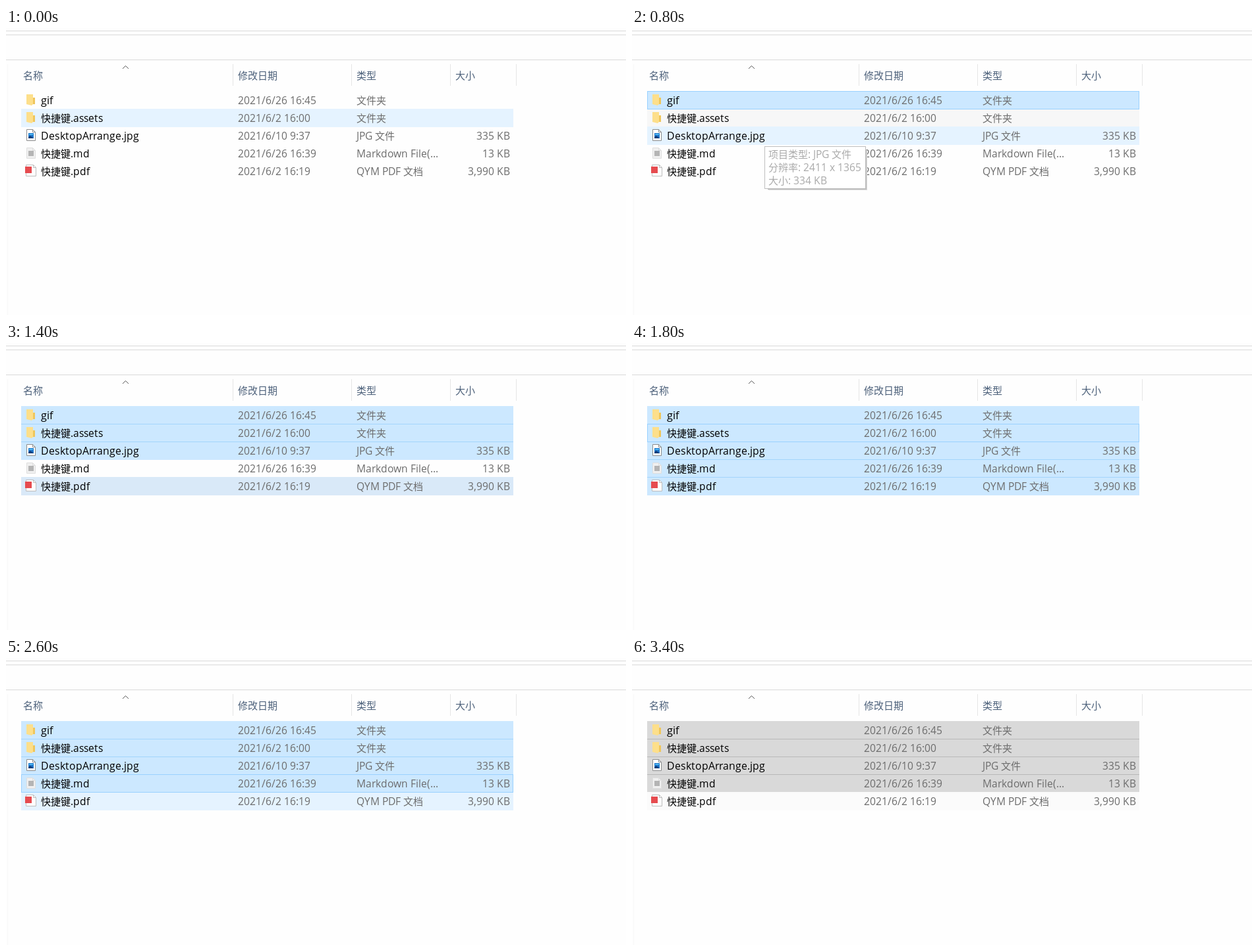
These frames come from a looping animation (941x437 px, 3600 ms). An HTML page with a canvas:

```html
<!DOCTYPE html>
<html lang="zh-CN">
<head>
<meta charset="utf-8">
<style>
html, body { margin: 0; width: 100%; height: 100%; overflow: hidden; background: #fefefe; }
canvas { display: block; }
</style>
</head>
<body>
<canvas id="stage" width="941" height="437"></canvas>
<script>
const ctx = document.getElementById('stage').getContext('2d');
const LOOP = 3600, TOP = 96, PITCH = 27, LEFT = 23, WIDTH = 747;

// icon, name, name size, modified, type, size
const files = [
  [folder, 'gif', 16.2, '2021/6/26 16:45', '文件夹', ''],
  [folder, '快捷键.assets', 15.6, '2021/6/2 16:00', '文件夹', ''],
  [picture, 'DesktopArrange.jpg', 15.8, '2021/6/10 9:37', 'JPG 文件', '335 KB'],
  [markdown, '快捷键.md', 15.6, '2021/6/26 16:39', 'Markdown File(...', '13 KB'],
  [pdf, '快捷键.pdf', 15.6, '2021/6/2 16:19', 'QYM PDF 文档', '3,990 KB'],
];

// h hover, s selected, b selected with border, g inactive, f/l/p fading
const fills = {
  h: '#e5f3ff', s: '#cce8ff', b: '#cce8ff', g: '#d9d9d9',
  f: '#f7f7f7', l: '#fbfbfb', p: '#d9e9f8',
};

// start time, one state per row
const steps = [
  [0, '.h...'], [400, 'h....'], [600, 'bh...'], [800, 'bfh..'], [1000, 'ssb..'],
  [1200, 'ssb.p'], [1400, 'sss.p'], [1600, 'sssbs'], [1800, 'sbsss'], [2000, 'sb.ff'],
  [2200, 'sbhff'], [2400, 'sssbf'], [2600, 'sssbh'], [3000, 'sssbl'], [3400, 'ggggl'],
];

function rect(x, y, w, h, color) {
  ctx.fillStyle = color;
  ctx.fillRect(x, y, w, h);
}

function frame(x, y, w, h, color) {
  ctx.lineWidth = 1;
  ctx.strokeStyle = color;
  ctx.strokeRect(x + .5, y + .5, w - 1, h - 1);
}

function shape(points, fill, stroke) {
  ctx.beginPath();
  for (let i = 0; i < points.length; i += 2) ctx.lineTo(points[i], points[i + 1]);
  if (fill) { ctx.closePath(); ctx.fillStyle = fill; ctx.fill(); }
  if (stroke) { ctx.lineWidth = 1; ctx.strokeStyle = stroke; ctx.stroke(); }
}

// Whole-pixel advances, as in hinted interface text; Chinese is slightly smaller
function text(str, x, y, color, size = 15.6, alignRight = false) {
  const advance = char => {
    ctx.font = char >= '\u4e00'
      ? '15px "Noto Sans CJK SC", "Noto Sans CJK", sans-serif'
      : `${size}px "Open Sans", "Noto Sans", sans-serif`;
    return Math.round(ctx.measureText(char).width);
  };
  if (alignRight) x -= [...str].reduce((sum, char) => sum + advance(char), 0);
  ctx.fillStyle = color;
  for (const char of str) {
    const width = advance(char);
    ctx.fillText(char, x, y);
    x += width;
  }
}

function folder(y) {
  rect(31, y + 10, 13, 10, '#efc65c');
  shape([31, y + 5, 41, y + 5, 41, y + 20, 39, y + 22, 31, y + 20], '#fddf8b');
}

function page(x, y, w, h, fill, line) {
  shape([x, y, x + w - 4, y, x + w, y + 4, x + w, y + h, x, y + h, x, y], fill, line);
  shape([x + w - 4, y, x + w - 4, y + 4, x + w, y + 4], null, line);
}

function picture(y) {
  page(31.5, y + 4.5, 13, 17, '#fff', '#8c8c8c');
  rect(34, y + 10, 8, 8, '#1c74c8');
  rect(35, y + 11, 6, 2, '#4db4ef');
  shape([34, y + 18, 34, y + 16, 37, y + 14, 42, y + 18], '#103c78');
}

function markdown(y) {
  page(31.5, y + 5.5, 13, 16, '#f0f0f0', '#dedede');
  rect(34, y + 10, 8, 8, '#b4b4b4');
}

function pdf(y) {
  page(30.5, y + 4.5, 15, 17, '#fff', '#bcbcbc');
  rect(29, y + 7, 10, 10, '#e64b4f');
}

function chrome() {
  rect(0, 0, 941, 437, '#fefefe');
  for (const y of [4, 10, 48]) rect(0, y, 941, 1, '#d9d9d9');
  rect(2, 55, 1, 382, '#f8f8f8');
  for (const x of [344, 524, 674, 774]) rect(x, 55, 1, 33, '#e5e5e5');
  shape([177, 62, 181.5, 57.5, 186, 62], null, '#5a5a5a');
  [['名称', 26], ['修改日期', 352], ['类型', 532], ['大小', 682]]
    .forEach(([label, x]) => text(label, x, 78, '#4c607a'));
}

function highlights(states) {
  const rowY = i => TOP + i * PITCH;
  const selected = s => 'sbg'.includes(s);
  states.forEach((s, i) => {
    if (fills[s]) rect(LEFT, rowY(i), WIDTH, 28, fills[s]);
  });
  states.forEach((s, i) => {
    if (i && selected(s) && selected(states[i - 1]))
      rect(LEFT, rowY(i), WIDTH, 1, s === 'g' ? '#b8b8b8' : '#a3d5fc');
  });
  states.forEach((s, i) => {
    if (s === 'b') frame(LEFT, rowY(i), WIDTH, 28, '#99d1ff');
  });
}

function tooltip() {
  rect(207, 186, 150, 61, '#dadada');
  rect(206, 185, 150, 61, '#bebebe');
  rect(201, 180, 154, 65, '#fff');
  frame(201, 180, 154, 65, '#bebebe');
  ['项目类型: JPG 文件', '分辨率: 2411 x 1365', '大小: 334 KB']
    .forEach((line, i) => text(line, 207, 198 + i * 20, '#aaa'));
}

function draw(now) {
  const t = now % LOOP;
  const [start, states] = steps.findLast(([time]) => time <= t);
  chrome();
  highlights([...states]);
  files.forEach(([icon, name, nameSize, date, type, size], i) => {
    const y = TOP + i * PITCH, base = y + 20;
    icon(y);
    text(name, 53, base, '#000', nameSize);
    text(date, 352, base, '#6d6d6d');
    text(type, 532, base, '#6d6d6d');
    text(size, 765, base, '#6d6d6d', 15.6, true);
  });
  if (start === 800) tooltip();
  requestAnimationFrame(() => draw(performance.now()));
}

draw(0);
</script>
</body>
</html>
```
